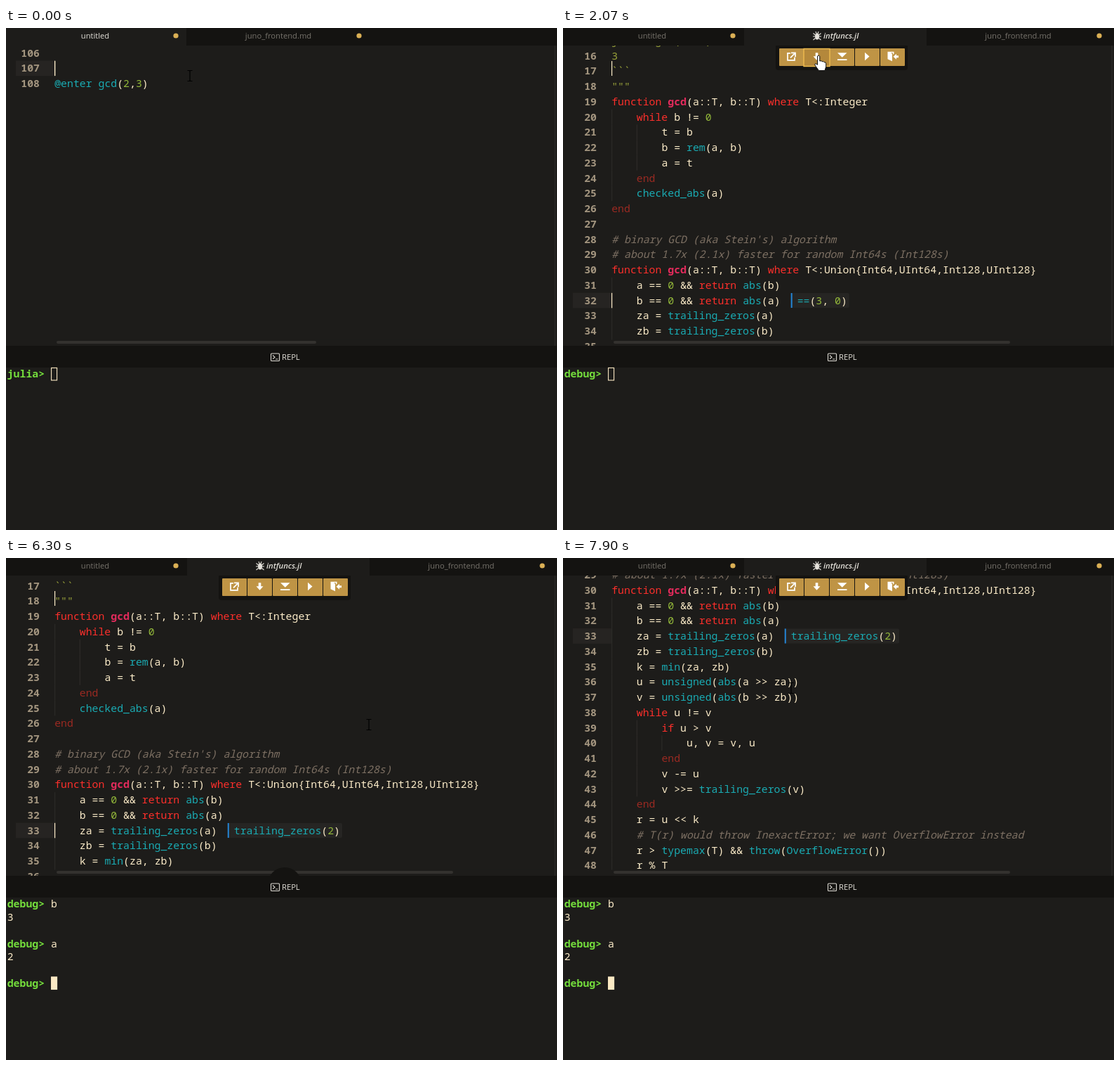
These frames come from a looping animation (785x714 px, 7.99 s). An HTML page:

```html
<!DOCTYPE html>
<html lang="en">
<head>
<meta charset="utf-8">
<title>Debugger session</title>
<style>
  html, body { margin: 0; width: 100%; height: 100%; overflow: hidden; background: #1d1c1a; }
  svg { display: block; }
  text { white-space: pre; }
  .mono { font: 500 14.83px "Noto Sans Mono", monospace; fill: #fbebc8; }
  .ui { font: 11.2px "Open Sans", sans-serif; fill: #77736c; }
  .ui.on { fill: #e4e1da; }
  .ui.file { font-weight: 600; font-style: italic; }
  .num { font-weight: 600; fill: #a3957f; text-anchor: end; }
  .kw { fill: #fb2f2b; }
  .end { fill: #9a2a22; }
  .def { fill: #e32b5c; font-weight: 700; }
  .call { fill: #1aabb3; }
  .lit { fill: #93b83a; }
  .str { fill: #98a13a; }
  .com { fill: #7d7063; font-style: italic; font-weight: 400; }
  .prompt { fill: #74dd3c; font-weight: 600; }
</style>
</head>
<body>
<svg id="stage" width="785" height="714" viewBox="0 0 785 714">
  <defs><clipPath id="pane"><rect y="25" width="785" height="427"/></clipPath></defs>
  <rect width="785" height="714" fill="#1d1c1a"/>
  <g clip-path="url(#pane)">
    <rect id="gutter" x="14" width="55" height="21.75" fill="#262422"/>
    <g id="scratch"></g>
    <g id="source"></g>
    <g id="result">
      <rect id="resultBox" height="21" rx="2" fill="#262523"/>
      <rect id="resultBar" width="2" height="21" fill="#2485d6"/>
      <text id="resultText" class="mono"></text>
    </g>
    <rect id="caret" width="1.2" height="21.5" fill="#fbebc8"/>
    <rect id="stale" x="69" y="47" width="1.2" height="21" fill="#fbebc8"/>
    <rect x="69" y="443.5" width="713" height="9" fill="#1d1c1a"/>
    <path d="M782 25V452" stroke="#2e2c2a"/>
    <rect id="hbar" x="72" y="445" height="4" rx="2" fill="#34322f"/>
    <g id="toggle">
      <circle cx="397" cy="452" r="24" fill="#141311"/>
      <path d="M392.5 442.5l4.5 4.5 4.5-4.5" fill="none" stroke="#c9c6c0" stroke-width="1.6"/>
    </g>
  </g>
  <rect width="785" height="25" fill="#141311"/>
  <rect id="activeTab" height="25" fill="#1d1c1a"/>
  <g id="tabs"></g>
  <g id="toolbar">
    <path d="M303 25H491V56q0 4-4 4H307q-4 0-4-4Z" fill="#141311"/>
    <g id="buttons"></g>
    <rect id="focus" x="343" y="29.500" width="37" height="25" fill="#b4883b" stroke="#f0bd50" stroke-width="1.4"/>
    <g fill="#fff" transform="translate(0 -.7)">
      <path d="M324 36.5h-4v10h10v-4M325 36h6v6M330.500 36.500l-6.500 6.500" fill="none" stroke="#fff" stroke-width="1.7"/>
      <path d="M359.700 36h3.600v5h3.200l-5 5.500-5-5.500h3.200z"/>
      <path d="M391 36h13.500l-6.750 6.500zM391 45h13.500v1.800h-13.500z"/>
      <path d="M430 35.500l6.500 5.700-6.500 5.700z"/>
      <path d="M462.500 34.500h9v3.500h-1.500v-2h-3l2 1.500v10.500l-6.500-3z"/>
      <path d="M475 37.500v2.500h3v3h-3v2.500l-4.500-4z"/>
    </g>
  </g>
  <rect y="452" width="785" height="31" fill="#141311"/>
  <g fill="none" stroke="#dcd9d2" stroke-width="1.1">
    <rect x="377.500" y="463" width="12" height="10.500" rx="1"/>
    <path d="M380 465.500l3 2.700-3 2.700M384 471h3.500"/>
  </g>
  <text class="ui on" x="393" y="472">REPL</text>
  <g id="repl"></g>
  <rect id="block" width="8" height="17.600" stroke="#fbe9c4" stroke-width="1.1"/>
  <path id="beam" d="M-3.500-7.500h2.500q1 0 1 1 0-1 1-1h2.500M0-6.500V6.500M-3.500 7.500h2.500q1 0 1-1 0 1 1 1h2.500" fill="none" stroke="#000" stroke-width="1.200"/>
  <path id="hand" d="M-1.500-1q1.800-1.800 3.300 0V6q3-1 3.300.8 2.500-.8 3 .9 2.600-.4 2.600 2v4.300l-1.700 5.500h-8.500l-5.500-7.500q-.8-2 1-2.400l2.500 1.700z" fill="#fff" stroke="#111" stroke-width="1"/>
</svg>
<script>
const LOOP = 7990, CW = 8.898, LH = 21.75, LEFT = 69.2, ROW = 18.75;
const REPL_CW = 8.87;
const $ = id => document.getElementById(id);
const set = (el, attrs) => { for (const k in attrs) el.setAttribute(k, attrs[k]); };
const show = (el, on) => el.setAttribute('display', on ? 'inline' : 'none');

function add(parent, tag, attrs, text) {
  const el = document.createElementNS('http://www.w3.org/2000/svg', tag);
  set(el, attrs);
  if (text !== undefined) el.textContent = text;
  return parent.appendChild(el);
}

// Last entry whose time has been reached.
const at = (keys, t) => keys.filter(k => k[0] <= t).pop();

function along(keys, t) {
  const i = keys.findIndex(k => k[0] > t);
  if (i < 0) return keys[keys.length - 1].slice(1);
  if (i === 0) return keys[0].slice(1);
  const a = keys[i - 1], b = keys[i], u = (t - a[0]) / (b[0] - a[0]);
  return a.slice(1).map((v, n) => v + (b[n + 1] - v) * u);
}

const TOKEN = /#.*|@\w+|^==(?=\()|\w+|\s+|[^\w\s]/g;

function tokenClass(tok, line, next) {
  if (tok[0] === '#') return 'com';
  if (/^(function|while|where|if|return)$/.test(tok)) return 'kw';
  if (tok === 'end') return 'end';
  if (tok === 'gcd' && line.startsWith('function')) return 'def';
  if (/^\d+$/.test(tok)) return 'lit';
  if (tok[0] === '@' || next === '(' && /^(\w+|==)$/.test(tok)) return 'call';
  return '';
}

function paint(el, line, quoted) {
  el.textContent = '';
  if (quoted) { add(el, 'tspan', { class: 'str' }, line); return; }
  for (const m of line.matchAll(TOKEN))
    add(el, 'tspan', { class: tokenClass(m[0], line, line[m.index + m[0].length]) }, m[0]);
}

// The first line is centred on y = 0.
function listing(group, first, lines, isQuoted) {
  lines.forEach((line, i) => {
    const y = i * LH, n = first + i;
    const depth = line.search(/\S|$/) / 4;
    for (let d = 0; d < depth; d++)
      add(group, 'rect', { x: LEFT + d * 4 * CW, y: y - LH / 2, width: 1, height: LH, fill: '#302e2b' });
    add(group, 'text', { class: 'mono num', x: 48, y: y + 5 }, n);
    paint(add(group, 'text', { class: 'mono', x: LEFT, y: y + 5 }), line, isQuoted(n));
  });
}

const CODE = `
julia> gcd(6,-9)
3
\`\`\`
"""
function gcd(a::T, b::T) where T<:Integer
    while b != 0
        t = b
        b = rem(a, b)
        a = t
    end
    checked_abs(a)
end

# binary GCD (aka Stein's) algorithm
# about 1.7x (2.1x) faster for random Int64s (Int128s)
function gcd(a::T, b::T) where T<:Union{Int64,UInt64,Int128,UInt128}
    a == 0 && return abs(b)
    b == 0 && return abs(a)
    za = trailing_zeros(a)
    zb = trailing_zeros(b)
    k = min(za, zb)
    u = unsigned(abs(a >> za))
    v = unsigned(abs(b >> zb))
    while u != v
        if u > v
            u, v = v, u
        end
        v -= u
        v >>= trailing_zeros(v)
    end
    r = u << k
    # T(r) would throw InexactError; we want OverflowError instead
    r > typemax(T) && throw(OverflowError())
    r % T`.split('\n');
const FIRST = 14;

listing($('scratch'), 106, ['', '', '@enter gcd(2,3)'], () => false);
set($('scratch'), { transform: 'translate(0 35.5)' });
listing($('source'), FIRST, CODE, n => n < 19);

for (let i = 0; i < 5; i++)
  add($('buttons'), 'rect', { x: 308 + i * 36, y: 29, width: 35, height: 25, rx: 1, fill: '#bf9445' });

function tab(parent, x, name, on, dot) {
  add(parent, 'text', { class: on ? 'ui on' : 'ui', x, y: 15, 'text-anchor': 'middle' }, name);
  add(parent, 'circle', { cx: dot, cy: 11, r: 3.6, fill: '#dbb055' });
}
const before = add($('tabs'), 'g', {}), after = add($('tabs'), 'g', {});
tab(before, 127, 'untitled', true, 242);
tab(before, 388, 'juno_frontend.md', false, 503);
tab(after, 127, 'untitled', false, 242);
tab(after, 648.5, 'juno_frontend.md', false, 764);
add(after, 'text', { class: 'ui on file', x: 371, y: 15 }, 'intfuncs.jl');
add(after, 'ellipse', { cx: 362, cy: 12, rx: 3, ry: 4.5, fill: '#e4e1da' });
add(after, 'path', { d: 'M356.5 7.5l3 2.5M356 12h12M356.5 17l3-2.5M367.5 7.5l-3 2.5M367.5 17l-3-2.5M360 5l1 3M364 5l-1 3', stroke: '#e4e1da', 'stroke-width': 1.1, fill: 'none' });

const replRows = Array.from({ length: 7 }, (_, r) => {
  const row = add($('repl'), 'text', { class: 'mono', x: 1.7, y: 483 + r * ROW + 14.4 });
  return { prompt: add(row, 'tspan', { class: 'prompt' }), text: add(row, 'tspan', {}) };
});

// Time, contents of the rows, cursor row, cursor column.
const REPL = [
  [0, ['julia> '], 0, 7],
  [670, ['debug> '], 0, 7],
  [3950, ['debug> b'], 0, 8],
  [4440, ['debug> b'], 1, 0],
  [4650, ['debug> b', '3', '', 'debug> '], 3, 7],
  [5370, ['debug> b', '3', '', 'debug> a'], 3, 8],
  [5730, ['debug> b', '3', '', 'debug> a'], 4, 0],
  [5880, ['debug> b', '3', '', 'debug> a', '2', '', 'debug> '], 6, 7]
];
const STEPS = [[0, 31, ''], [670, 31, '==(2, 0)'], [1850, 32, '==(3, 0)'], [2180, 33, ''], [2320, 33, 'trailing_zeros(2)']];
const WHEEL = [6450, 6670, 6740, 6820, 6900, 7150, 7220];
const MOUSE = [
  [0, 262, 68], [79, 262, 68], [80, 257, 74], [129, 257, 74], [130, 254, 80], [800, 254, 80],
  [1380, 364, 41], [2550, 364, 41], [2700, 392, 494], [2780, 394, 500], [2950, 428, 625],
  [6050, 428, 625], [6300, 517, 237], [6360, 517, 237], [6670, 380, 330], [6980, 364, 341],
  [7290, 363, 368], [7470, 363, 368], [7900, 325, 185]
];
const TOGGLE = [[2690, 25], [2700, 22], [2790, 22], [2950, 0], [6150, 0], [6300, 12], [6360, 12], [6450, 25]];
const CARET = [[0, 1], [3950, 0], [5880, 1], [7640, 0]];

function render(t) {
  const open = t >= 600, ready = t >= 670;
  show(before, !open); show(after, open);
  show($('scratch'), !open); show($('source'), open);
  set($('activeTab'), open ? { x: 258, width: 260 } : { x: 0, width: 257 });
  set($('hbar'), { width: open ? 565 : 370 });
  show($('toolbar'), ready);
  show($('focus'), t >= 1470 && t < 3100);

  const [, line, value] = at(STEPS, t);
  const ticks = WHEEL.filter(w => w <= t).length;
  const y33 = (line === 31 ? 441 : line === 32 ? 409.25 : 387.5) - 39.5 * ticks;
  set($('source'), { transform: `translate(0 ${y33 - (33 - FIRST) * LH})` });

  const typed = t >= 370;
  const y = open ? y33 + (line - 33) * LH : typed ? 79 : 57.3;
  set($('gutter'), { y: y - LH / 2 });
  set($('caret'), { x: !open && typed ? LEFT + 15 * CW : 69, y: y - 10.7 });
  show($('caret'), at(CARET, t)[1]);
  show($('stale'), t < 6450);

  show($('result'), open && value);
  if (value) {
    const x = LEFT + CODE[line - FIRST].length * CW + 15.2;
    set($('resultBox'), { x, y: y - 10.5, width: value.length * CW + 12 });
    set($('resultBar'), { x, y: y - 10.5 });
    set($('resultText'), { x: x + 9, y: y + 5 });
    paint($('resultText'), value);
  }

  const [, rows, curRow, curCol] = at(REPL, t);
  replRows.forEach((r, i) => {
    const s = rows[i] || '', cut = s.indexOf('> ') + 1;
    r.prompt.textContent = s.slice(0, cut);
    r.text.textContent = s.slice(cut);
  });
  set($('block'), { x: 2.5 + curCol * REPL_CW, y: 483.4 + curRow * ROW, fill: t >= 3100 ? '#fbe9c4' : 'none' });

  set($('toggle'), { transform: `translate(0 ${along(TOGGLE, t)[0]})` });

  const [mx, my] = along(MOUSE, t);
  const hand = ready && mx > 308 && mx < 487 && my > 30 && my < 55;
  show($('hand'), hand); show($('beam'), !hand);
  set($(hand ? 'hand' : 'beam'), { transform: `translate(${mx} ${my})` });
}

const start = performance.now();
function frame() {
  render((performance.now() - start) % LOOP);
  requestAnimationFrame(frame);
}
render(0);
requestAnimationFrame(frame);
</script>
</body>
</html>
```
